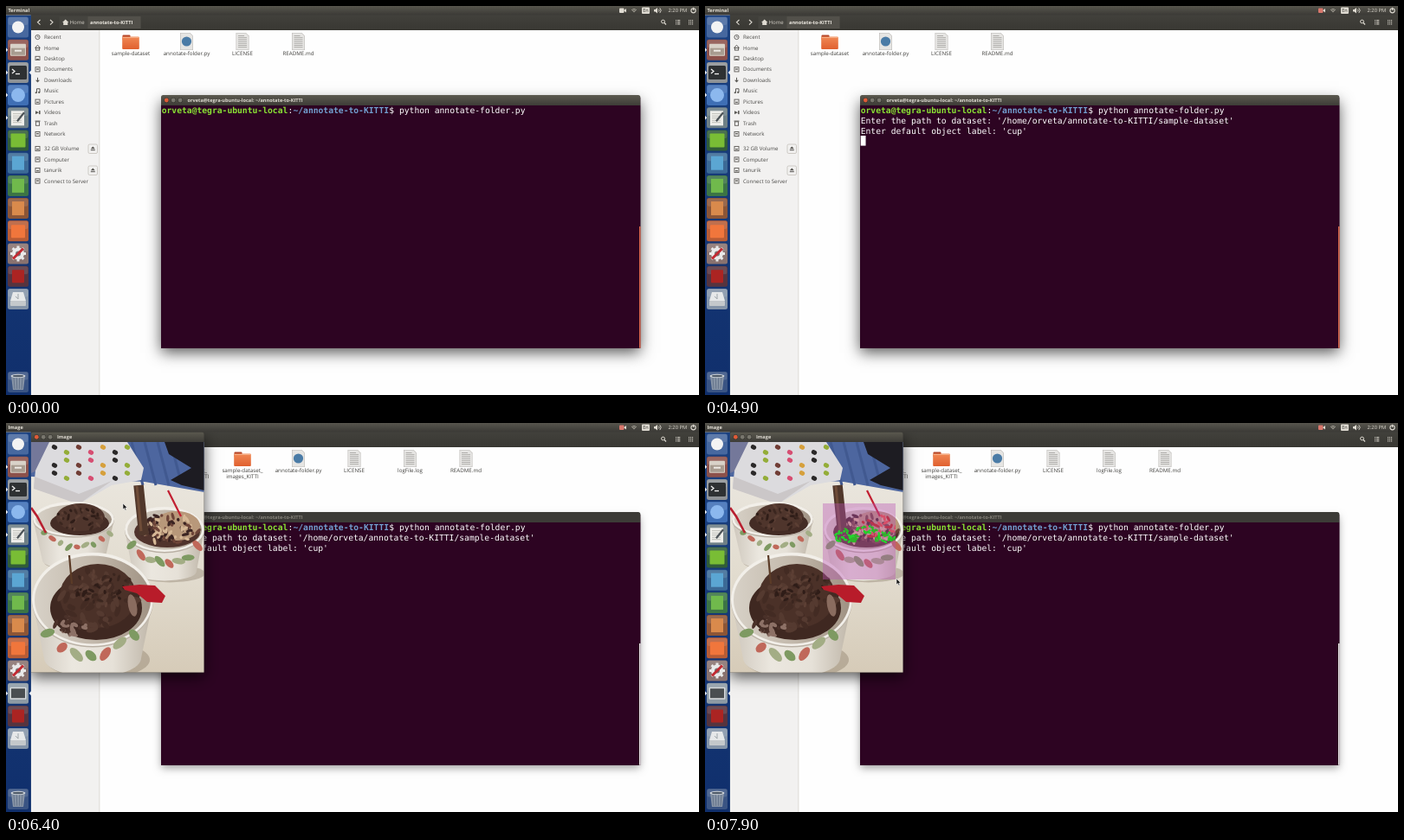
Animation of 800x450 px, one loop 8 s. Source, as an HTML page with a canvas:

```html
<!DOCTYPE html>
<html lang="en">
<head>
<meta charset="utf-8">
<title>Folder annotation</title>
<style>
html, body { margin: 0; width: 100%; height: 100%; overflow: hidden; background: #fefefe; }
canvas { display: block; width: 800px; height: 450px; }
</style>
</head>
<body>
<canvas id="stage" width="800" height="450"></canvas>
<script>
const LOOP = 8000;
const ctx = document.getElementById('stage').getContext('2d');
ctx.textRendering = 'geometricPrecision';

const UI = '"Open Sans", sans-serif';
const MONO = '"DejaVu Sans Mono", monospace';
const CHAR = 5.835, LINE = 11.6, TERM_X = 179.7, TERM_Y = 115.2;
const USER = 'orveta';
const FOLDER = '~/annotate-to-KITTI';

function box(x, y, w, h, color) {
  ctx.fillStyle = color;
  ctx.fillRect(x, y, w, h);
}
function round(x, y, w, h, r, color) {
  ctx.fillStyle = color;
  ctx.beginPath();
  ctx.roundRect(x, y, w, h, r);
  ctx.fill();
}
function oval(x, y, rx, ry, color, turn = 0) {
  ctx.fillStyle = color;
  ctx.beginPath();
  ctx.ellipse(x, y, rx, ry, turn, 0, Math.PI * 2);
  ctx.fill();
}
function disc(x, y, r, color) { oval(x, y, r, r, color); }
function poly(points, color) {
  ctx.fillStyle = color;
  ctx.beginPath();
  points.forEach(([x, y]) => ctx.lineTo(x, y));
  ctx.closePath();
  ctx.fill();
}
function stroke(points, color, width = 1) {
  ctx.strokeStyle = color;
  ctx.lineWidth = width;
  ctx.beginPath();
  points.forEach(([x, y]) => ctx.lineTo(x, y));
  ctx.stroke();
}
function ring(x, y, r, color, width = 1) {
  ctx.strokeStyle = color;
  ctx.lineWidth = width;
  ctx.beginPath();
  ctx.arc(x, y, r, 0, Math.PI * 2);
  ctx.stroke();
}
function text(str, x, y, color, size = 6.1, bold = false, align = 'left') {
  ctx.font = `${bold ? 'bold ' : ''}${size}px ${UI}`;
  ctx.textAlign = align;
  ctx.textBaseline = 'alphabetic';
  ctx.fillStyle = color;
  ctx.fillText(str, x, y);
}
function gradient(x0, y0, x1, y1, ...colors) {
  const g = ctx.createLinearGradient(x0, y0, x1, y1);
  colors.forEach((c, i) => g.addColorStop(i / (colors.length - 1), c));
  return g;
}
function vertical(y0, y1, ...colors) { return gradient(0, y0, 0, y1, ...colors); }
function shadowed(blur, alpha, dy, draw) {
  ctx.save();
  ctx.shadowColor = `rgba(0,0,0,${alpha})`;
  ctx.shadowBlur = blur;
  ctx.shadowOffsetY = dy;
  draw();
  ctx.restore();
}
function seeded(seed) {
  return () => (seed = (seed * 16807) % 2147483647) / 2147483647;
}

function topBar(title, recording) {
  box(0, 0, 800, 10.5, vertical(0, 10, '#57554d', '#3c3b37'));
  text(title, 2.5, 7.3, '#e8e4da', 5.6, true);
  const ink = '#dfdbd2';
  round(708, 2.5, 5.5, 5.5, 1, recording ? '#d9776c' : ink);
  poly([[713, 5.2], [716, 3], [716, 7.5]], ink);
  for (const r of [1.5, 3, 4.5]) {
    ctx.strokeStyle = '#a5a298';
    ctx.lineWidth = 0.9;
    ctx.beginPath();
    ctx.arc(725, 8, r, -2.3, -0.85);
    ctx.stroke();
  }
  round(734, 1.5, 9, 7.5, 1, ink);
  text('En', 738.5, 7.4, '#3c3b37', 5.6, false, 'center');
  poly([[748, 4], [749.5, 4], [752, 2], [752, 8.5], [749.5, 6.5], [748, 6.5]], ink);
  for (const r of [2, 4]) {
    ctx.beginPath();
    ctx.arc(752, 5.2, r, -0.8, 0.8);
    ctx.strokeStyle = ink;
    ctx.stroke();
  }
  text('2:20 PM', 764.5, 7.4, ink, 5.8);
  ring(793.5, 5.3, 2.6, ink, 1.1);
  box(793, 1.8, 1.1, 3.2, ink);
}

function toolbar() {
  box(29, 10, 771, 18, vertical(10, 28, '#42413c', '#393833'));
  stroke([[39.5, 16], [36.5, 18.8], [39.5, 21.6]], '#dfdbd2', 1.1);
  stroke([[51, 16], [54, 18.8], [51, 21.6]], '#dfdbd2', 1.1);
  box(61.5, 12, 94, 14, '#45443f');
  box(94.5, 12, 61, 14, '#52504a');
  poly([[65, 19], [68.7, 15.4], [72.4, 19], [71.3, 19], [71.3, 22], [66.2, 22], [66.2, 19]], '#dfdbd2');
  text('Home', 73.5, 20.9, '#d5d1c8', 6.1);
  text('annotate-to-KITTI', 97, 20.9, '#eeeae2', 5.6, true);
  ring(758.5, 18, 1.9, '#dfdbd2', 1);
  stroke([[760, 19.5], [762, 21.5]], '#dfdbd2', 1.2);
  for (let i = 0; i < 3; i++) {
    const y = 16.2 + i * 2.1;
    box(773, y, 1, 1, '#dfdbd2');
    box(774.8, y, 3.5, 1, '#dfdbd2');
    for (let j = 0; j < 3; j++) box(788 + j * 2, y, 1.1, 1.1, '#dfdbd2');
  }
}

function sidebar() {
  box(29, 28, 79, 422, '#f2f1f0');
  box(107.5, 28, 0.8, 422, '#d6d3ce');
  const places = ['Recent', 'Home', 'Desktop', 'Documents', 'Downloads', 'Music',
    'Pictures', 'Videos', 'Trash', 'Network', '32 GB Volume', 'Computer', 'tanurik', 'Connect to Server'];
  places.forEach((name, i) => {
    const y = i < 10 ? 36 + i * 12.45 : 165 + (i - 10) * 12.5;
    text(name, 44, y + 2.1, '#4b4a47', 6.15);
    placeIcon(i, y);
  });
  for (const y of [165, 190]) {
    ctx.lineWidth = 0.7;
    ctx.strokeStyle = '#bdb9b2';
    ctx.beginPath();
    ctx.roundRect(95, y - 5, 10.5, 10.5, 1.5);
    ctx.stroke();
    poly([[97.8, y + 0.3], [100.3, y - 2.5], [102.8, y + 0.3]], '#55534f');
    box(97.8, y + 1.2, 5, 1, '#55534f');
  }
}
function placeIcon(i, y) {
  const ink = '#5c5a56';
  ctx.strokeStyle = ink;
  ctx.lineWidth = 0.9;
  if (i === 0) {
    ring(36.5, y, 2.6, ink, 0.9);
    stroke([[36.5, y - 1.6], [36.5, y], [38, y]], ink, 0.7);
  } else if (i === 1) {
    stroke([[33.3, y], [36.5, y - 3], [39.7, y]], ink);
    ctx.strokeRect(34.4, y, 4.2, 2.6);
  } else if (i === 4) {
    stroke([[36.5, y - 3], [36.5, y + 1.5]], ink);
    poly([[34, y], [39, y], [36.5, y + 2.6]], ink);
  } else if (i === 5) {
    stroke([[35.5, y + 2], [35.5, y - 2.5], [39, y - 2.5], [39, y + 1.5]], ink);
    disc(34.7, y + 2, 1.1, ink);
    disc(38.2, y + 1.7, 1.1, ink);
  } else if (i === 7) {
    poly([[34, y - 2], [38, y], [34, y + 2]], ink);
    box(38, y - 2, 1.6, 4, ink);
  } else if (i === 8) {
    ctx.strokeRect(34.4, y - 1.7, 4.2, 4.4);
    box(33.5, y - 3, 6, 1, ink);
  } else {
    ctx.strokeRect(34, y - 2.6, 5, i === 2 ? 4.2 : 5.2);
    box(35.2, y - (i % 2), 2.6, 1.4, ink);
  }
}

function folderIcon(x) {
  round(x - 9.5, 33.5, 9, 6, 1, '#b5472a');
  round(x - 9.8, 35.5, 19.6, 14.5, 1, vertical(35, 50, '#f18a56', '#e0602f'));
  box(x - 9.3, 36, 18.6, 0.8, '#f7b792');
}
function pageIcon(x, script) {
  poly([[x - 7.5, 31], [x + 4, 31], [x + 7.5, 34.5], [x + 7.5, 51], [x - 7.5, 51]], '#bdbbb8');
  poly([[x - 6.9, 31.6], [x + 3.8, 31.6], [x + 6.9, 34.8], [x + 6.9, 50.4], [x - 6.9, 50.4]], '#e6e5e3');
  if (script) return disc(x, 41, 5.6, '#4a7ba6');
  for (let i = 0; i < 7; i++) box(x - 5, 34 + i * 2.2, i ? 10 : 7, 0.9, '#aaa8a5');
}
function fileItem(x, kind, ...label) {
  if (kind === 'folder') folderIcon(x);
  else pageIcon(x, kind === 'script');
  label.forEach((s, i) => text(s, x, 57.2 + i * 7, '#3f3e3b', 6.2, false, 'center'));
}
function files(done) {
  const list = done
    ? [['folder', 'sample-dataset_', 'annotations_KITTI'], ['folder', 'sample-dataset_', 'images_KITTI'],
       ['script', 'annotate-folder.py'], ['page', 'LICENSE'], ['page', 'logFile.log'], ['page', 'README.md']]
    : [['folder', 'sample-dataset'], ['script', 'annotate-folder.py'], ['page', 'LICENSE'], ['page', 'README.md']];
  list.forEach((item, i) => fileItem((done ? 208.5 : 144) + i * 64.5, ...item));
}

const tiles = {
  dash: ['#47689f', y => disc(14, y, 7, '#f3f3f3')],
  files: ['#8c514b', y => {
    round(5, y - 7, 18, 14, 1, '#d9d2c8');
    box(6, y - 2, 16, 8, '#a89c90');
    box(10, y, 8, 2, '#eeeae4');
  }],
  terminal: ['#8e9296', y => {
    round(4, y - 8, 20, 16, 1.5, '#2e3133');
    stroke([[7, y - 4], [10, y - 1.5], [7, y + 1]], '#f0f0f0', 1.3);
    box(11, y + 1, 5, 1.3, '#f0f0f0');
  }],
  browser: ['#3f6fb5', y => disc(14, y, 8, '#8cb8ee')],
  editor: ['#6f8086', y => {
    box(6, y - 8, 15, 17, '#eeeeea');
    for (let i = 0; i < 5; i++) box(8, y - 5 + i * 2.5, 10, 0.8, '#b5b5b0');
    stroke([[21, y - 6], [13, y + 4]], '#4c5357', 2.2);
  }],
  ide: ['#315d38', y => round(5.5, y - 8, 17, 16, 1, '#79bd35')],
  writer: ['#3c6a96', y => box(7, y - 8, 14, 16, '#5ba6d3')],
  calc: ['#3c7445', y => box(7, y - 8, 14, 16, '#70b94c')],
  slides: ['#8c5536', y => box(7, y - 8, 14, 16, '#d98a4c')],
  store: ['#b85c35', y => round(6, y - 7, 16, 15, 1, '#f0763c')],
  settings: ['#89726f', y => {
    for (let a = 0; a < 8; a++) {
      const c = Math.cos(a * Math.PI / 4), s = Math.sin(a * Math.PI / 4);
      stroke([[14 + c * 5, y + s * 5], [14 + c * 9, y + s * 9]], '#e9e9e9', 3);
    }
    disc(14, y, 7, '#e9e9e9');
    disc(14, y, 3, '#777');
    stroke([[20, y - 6], [8, y + 6]], '#c22a32', 3);
  }],
  image: ['#8d9aa4', y => {
    round(4.5, y - 7, 19, 14, 1, '#d6d9da');
    box(6, y - 5.5, 16, 11, '#4a4e51');
  }],
  card: ['#56343f', y => round(7, y - 7.5, 14, 15, 1, '#ab2422')],
  disk: ['#8494a8', y => {
    poly([[8, y - 8], [20, y - 8], [23, y + 2], [5, y + 2]], '#e6e8e9');
    round(5, y + 2, 18, 6, 1, '#c4c8cb');
    stroke([[14, y - 6], [14, y], [11, y - 3]], '#9da4a9', 1);
  }],
  trash: ['#3a5483', y => {
    poly([[6, y - 7], [22, y - 7], [20, y + 9], [8, y + 9]], '#8794a6');
    for (let i = 0; i < 4; i++) stroke([[9 + i * 3.3, y - 5], [10 + i * 2.7, y + 8]], '#66758c', 1);
    oval(14, y - 7, 8.5, 2.2, '#d5dade');
    oval(14, y - 7, 6.5, 1.3, '#4e5a69');
  }]
};
function tile(name, y) {
  const [color, draw] = tiles[name];
  round(2, y - 12, 24, 24, 2.5, color);
  round(2.6, y - 11.4, 22.8, 9, 2, 'rgba(255,255,255,.12)');
  draw(y);
}
function launcher(done) {
  box(0, 10.5, 29, 439.5, vertical(10, 450, '#1b4180', '#102f6c'));
  box(28.3, 10.5, 0.7, 439.5, '#27477c');
  const names = ['dash', 'files', 'terminal', 'browser', 'editor', 'ide', 'writer', 'calc',
    'slides', 'store', 'settings', ...(done ? ['image'] : []), 'card', 'disk'];
  names.forEach((name, i) => tile(name, 24.5 + i * 26.2));
  tile('trash', 435);
  const left = (y) => poly([[0, y - 2.5], [2.2, y], [0, y + 2.5]], '#e8edf5');
  for (let i = 1; i < 5; i++) left(24.5 + i * 26.2);
  const focus = 24.5 + 26.2 * (done ? 11 : 2);
  if (done) left(focus);
  poly([[29, focus - 2.5], [26.6, focus], [29, focus + 2.5]], '#e8edf5');
}

function titleBar(x, y, w, h, title, active, tx) {
  ctx.fillStyle = active ? vertical(y, y + h, '#5b594f', '#3d3c37') : '#3c3b37';
  ctx.beginPath();
  ctx.roundRect(x, y, w, h, [2.5, 2.5, 0, 0]);
  ctx.fill();
  ['#df5b38', '#78766d', '#78766d'].forEach((c, i) => {
    disc(x + 6.3 + i * 7.9, y + h / 2, 2.9, '#35342f');
    disc(x + 6.3 + i * 7.9, y + h / 2, 2.4, active ? c : '#55534c');
  });
  text(title, tx, y + h / 2 + 2.1, active ? '#dfdbd2' : '#85827a', 5.6, true);
}

function termText(str, col, row, color = '#fff', bold = false) {
  ctx.font = `${bold ? 'bold ' : ''}9.69px ${MONO}`;
  ctx.textAlign = 'left';
  ctx.fillStyle = color;
  ctx.fillText(str, TERM_X + col * CHAR, TERM_Y + row * LINE + 9.2);
}
function terminalLines(t) {
  const rows = [];
  if (t >= 100) rows.push('');
  if (t >= 500) rows[0] = 'Enter the path to dataset: ';
  if (t >= 1900) rows[0] += `'/home/${USER}/annotate-to-KITTI/sample-dataset'`;
  if (t >= 3100) {
    const typed = [3400, 3900, 4000, 4700, 4700].filter(k => t >= k).length;
    rows.push('Enter default object label: ' + "'cup'".slice(0, typed));
  }
  if (t >= 4900) rows.push('');
  return rows;
}
function terminal(t, active) {
  shadowed(active ? 16 : 9, active ? 0.65 : 0.38, active ? 5 : 3, () => box(179, 106, 553.3, 289.7, '#2d0422'));
  titleBar(179, 103, 553.3, 12, `${USER}@tegra-ubuntu-local: ${FOLDER}`, active, 209.5);
  box(179, 115, 553.3, 280.7, '#2d0422');
  box(731, 255, 1.5, 140.7, active ? '#dc6a4e' : '#efeeed');
  termText(`${USER}@tegra-ubuntu-local`, 0, 0, '#8ae234', true);
  termText(':', 25, 0);
  termText(FOLDER, 26, 0, '#729fcf', true);
  termText('$ python annotate-folder.py', 45, 0);
  const rows = terminalLines(t);
  rows.forEach((row, i) => termText(row, 0, i + 1));
  if (rows.length) {
    const last = rows[rows.length - 1];
    box(TERM_X + last.length * CHAR, TERM_Y + rows.length * LINE, CHAR, LINE, '#fff');
  }
}

// x, y: rim centre; the body narrows towards the base
function cup(x, y, rx, ry, base, narrow) {
  const paper = gradient(x - rx, 0, x + rx, 0, '#cdc6bb', '#ebe7df', '#e6e1d8', '#bdb4a6');
  const foot = rx * narrow;
  oval(x + 6, base + 2, foot + 4, ry * 0.4, 'rgba(110,95,75,.3)');
  poly([[x - rx, y], [x + rx, y], [x + foot, base], [x - foot, base]], paper);
  oval(x, base, foot, ry * 0.4, paper);
  oval(x, y, rx, ry, paper);
}
function rim(x, y, rx, ry) {
  oval(x, y + 1.5, rx, ry, '#b9b0a4');
  oval(x, y, rx, ry, '#f2efe9');
  oval(x, y + 0.5, rx - 3, ry - 3, gradient(x - rx, 0, x + rx, 0, '#d8d2c8', '#c3b9ac', '#9e9081'));
}
function leaves(x, y, spread, sag, count, size, seed) {
  const rnd = seeded(seed);
  for (let i = 0; i < count; i++) {
    const k = i / (count - 1) * 2 - 1;
    const color = ['#7e9a62', '#c0685a', '#a3ad85'][i % 3];
    oval(x + k * spread, y + (1 - k * k) * sag + rnd() * size, size * (0.8 + rnd() * 0.5), size * 0.6, color, rnd() * 2 - 1);
  }
}
function crumbs(x, y, rx, ry, count, colors, size, seed) {
  const rnd = seeded(seed);
  for (let i = 0; i < count; i++) {
    const a = rnd() * 6.28, r = Math.sqrt(rnd());
    oval(x + Math.cos(a) * rx * r, y + Math.sin(a) * ry * r, size * (0.6 + rnd()), size * 0.6,
      colors[i % colors.length], rnd() * 3);
  }
}

function backdrop() {
  box(29, 22, 200, 267, vertical(60, 289, '#eae6de', '#e2dccf', '#d6cbb8'));
  poly([[29, 22], [229, 22], [229, 80], [160, 68], [29, 62]], '#4d669f');
  for (let i = 0; i < 4; i++) stroke([[145 + i * 15, 22], [158 + i * 15, 72]], '#415990', 3);
  poly([[183, 22], [229, 22], [229, 78], [203, 72], [190, 66], [214, 52], [188, 36]], '#1d1c22');
  poly([[29, 22], [52, 22], [36, 55], [29, 58]], '#74789a');
  poly([[50, 22], [140, 22], [159, 52], [156, 66], [122, 72], [84, 94], [32, 74], [34, 55]], '#dcdbde');
  poly([[33, 62], [84, 82], [122, 67], [84, 94], [32, 76]], '#cbc7c8');
  const dots = ['#2b2929', '#d64e72', '#94ad38', '#d6a03c', '#713d35'];
  for (let i = 0; i < 21; i++) {
    const row = Math.floor(i / 7);
    oval(56 + (i % 7) * 14, 28 + row * 15 + (i % 2) * 6, 3.3, 2.6, dots[(i * 2 + row) % 5], 0.5);
  }
}
function photo() {
  const cocoa = ['#2f1d18', '#5c3f34', '#3b261f'];
  ctx.save();
  ctx.beginPath();
  ctx.rect(29, 22, 199.5, 266.5);
  ctx.clip();
  backdrop();

  cup(78, 111, 47, 20, 160, 0.76);
  rim(78, 111, 47, 20);
  leaves(82, 127, 38, 13, 9, 4.5, 31);
  oval(85, 116, 34, 14, '#442c25');
  oval(86, 109, 28, 16, '#4f352c');
  crumbs(86, 110, 28, 15, 40, cocoa, 2.4, 11);
  stroke([[29, 98], [36, 108], [46, 127]], '#b82030', 2.6);

  cup(183, 123, 46, 26, 172, 0.8);
  rim(183, 123, 46, 26);
  leaves(183, 141, 38, 18, 8, 6, 73);
  oval(186, 126, 38, 18, '#50332c');
  oval(197, 119, 27, 17, '#b8987a');
  crumbs(188, 123, 34, 17, 75, ['#3b2422', '#d6b896', '#6d4438'], 2.8, 42);
  stroke([[153, 72], [159, 130]], '#50372b', 11.5);
  stroke([[151, 73], [156, 125]], '#6e4c38', 3);
  stroke([[187, 78], [202, 108]], '#c22032', 2.2);

  cup(100, 204, 70, 54, 272, 0.8);
  rim(100, 204, 70, 54);
  leaves(98, 243, 50, 20, 7, 8, 19);
  oval(104, 214, 53, 37, '#3f2821');
  oval(106, 200, 44, 37, '#4b3128');
  crumbs(106, 204, 46, 36, 60, ['#432b23', '#553a30'], 5, 8);
  crumbs(112, 190, 32, 21, 50, cocoa, 2.6, 27);
  crumbs(78, 235, 22, 12, 22, ['#8d7166', '#4a3129'], 3.6, 56);
  oval(146, 211, 5, 13, '#8a6c5f', -0.2);
  stroke([[73, 153], [76, 186]], '#5b3b27', 2.2);
  poly([[134, 189], [154, 187], [172, 188], [184, 200], [180, 208], [163, 207], [151, 197], [137, 193]], '#b81c2a');
  ctx.restore();
}

function along(t, keys) {
  if (t <= keys[0][0]) return keys[0].slice(1);
  for (let i = 1; i < keys.length; i++) {
    const a = keys[i - 1], b = keys[i];
    if (t <= b[0]) {
      const k = (t - a[0]) / (b[0] - a[0]);
      return [a[1] + (b[1] - a[1]) * k, a[2] + (b[2] - a[2]) * k];
    }
  }
  return keys[keys.length - 1].slice(1);
}
const pointerPath = [[5700, 290, 284], [6000, 206, 184], [6400, 135, 93], [6700, 136, 93],
  [7000, 179, 149], [7300, 206, 167], [7600, 221, 180]];
const cornerPath = [[6700, 136, 93], [7000, 173, 146], [7300, 202, 165], [7600, 218, 179], [7900, 220, 181]];

function selection(t) {
  const [x, y] = along(t, cornerPath);
  ctx.save();
  ctx.beginPath();
  ctx.rect(136, 93, x - 136, y - 93);
  ctx.clip();
  const alpha = 0.48 - 0.1 * Math.min(1, (t - 6800) / 800);
  box(136, 93, 90, 90, `rgba(185,80,180,${alpha})`);
  crumbs(200, 120, 21, 13, 22, ['#d64f69', '#b9344e'], 2.6, 91);
  const green = ['#24d52d', '#31b42b'];
  crumbs(163, 131, 13, 8, 28, green, 2.3, 17);
  crumbs(187, 124, 12, 5, 18, green, 2, 63);
  crumbs(208, 132, 13, 6, 22, green, 2.1, 37);
  ctx.restore();
}
function pointer(t) {
  const [x, y] = along(t, pointerPath);
  const shape = [[0, 0], [0, 7], [1.6, 5.6], [2.7, 8], [3.9, 7.4], [2.8, 5.1], [5, 5]].map(([a, b]) => [x + a, y + b]);
  poly(shape, '#181818');
  stroke([...shape, shape[0]], '#f4f4f4', 0.6);
}
function imageWindow(t) {
  shadowed(16, 0.65, 5, () => box(29, 12, 199.5, 276.5, '#3c3b37'));
  titleBar(29, 10.5, 199.5, 11.5, 'Image', true, 59);
  photo();
  if (t >= 6800) selection(t);
  if (t >= 5700) pointer(t);
}

function draw(now) {
  const t = Math.floor((now % LOOP) / 100) * 100;
  const done = t >= 5100;
  box(0, 0, 800, 450, '#fefefe');
  toolbar();
  sidebar();
  files(done);
  terminal(t, !done);
  if (done) imageWindow(t);
  launcher(done);
  topBar(done ? 'Image' : 'Terminal', t >= 100);
}

const start = performance.now();
function tick() {
  draw(performance.now() - start);
  requestAnimationFrame(tick);
}
tick();
</script>
</body>
</html>
```
